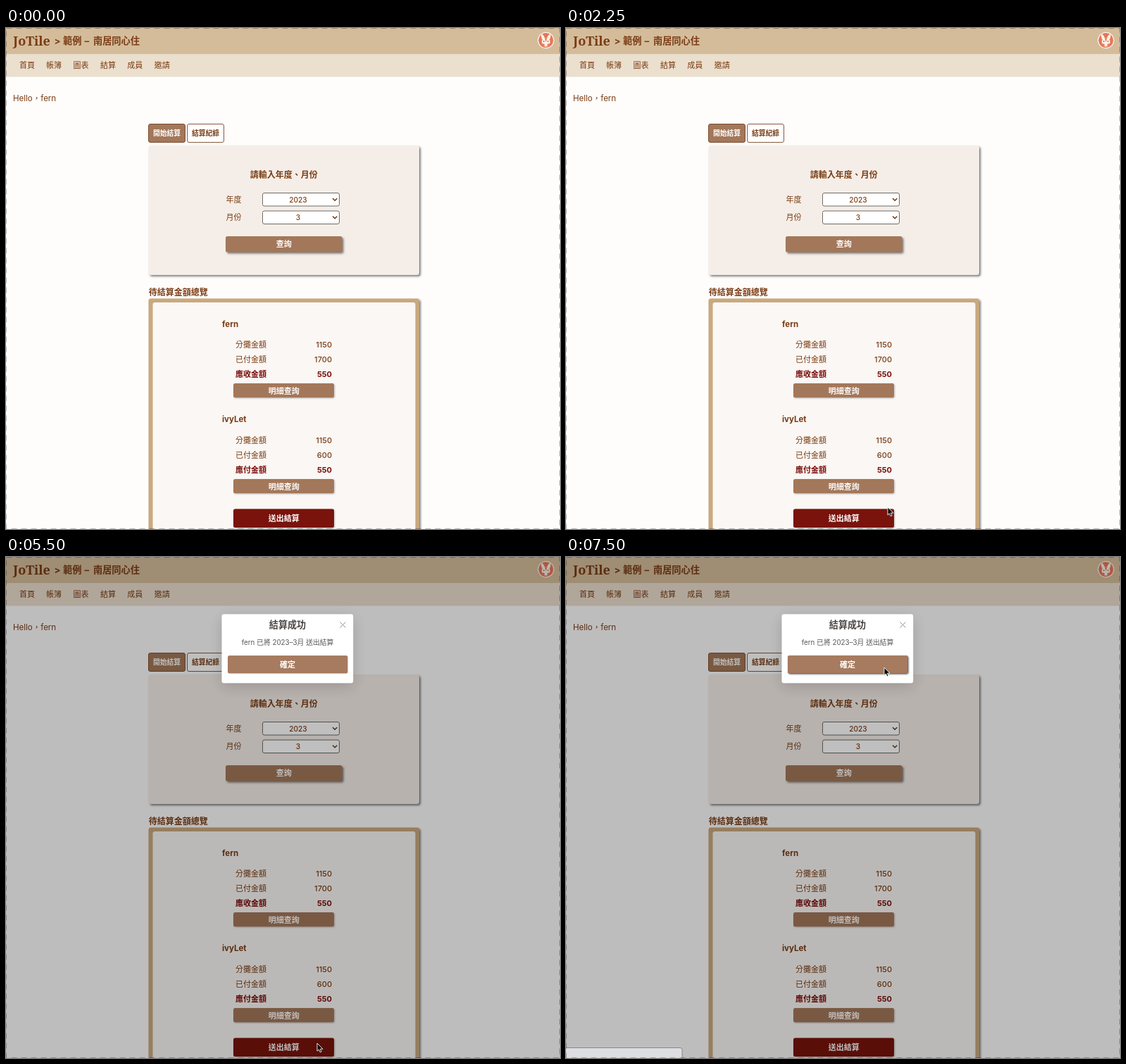
Animation, 787 px wide and 712 px high, one loop 8 s. Source, as an HTML page:

```html
<!DOCTYPE html>
<html lang="zh-Hant">
<head>
<meta charset="utf-8">
<title>結算</title>
<style>
  html, body { margin: 0; width: 100%; height: 100%; overflow: hidden; background: #fefdfc; }
  svg { display: block; width: 787px; height: 712px; }
  text {
    font: 500 11px Inter, "Noto Sans CJK TC", "Noto Sans CJK JP", "Noto Sans CJK", sans-serif;
    fill: #7a3c14;
    white-space: pre;
  }
  .b { font-weight: 700; }
  .mid { text-anchor: middle; }
  .end { text-anchor: end; }
  .s { font-size: 9.8px; }
  .l { font-size: 12px; }
  .crumb { font-size: 13.2px; font-weight: 700; }
  .logo { font: 700 18px "Noto Serif", serif; }
  .hello { font-size: 11.5px; font-weight: 400; }
  .light { fill: #fff; font-weight: 700; }
  .due { fill: #7b0f0b; font-weight: 700; }
  .btn { fill: #a3775a; }
  .send { fill: #79130b; }
  .soft { filter: drop-shadow(1px 1px 1px rgba(0, 0, 0, .25)); }
  .deep { filter: drop-shadow(2px 2px 1.5px rgba(0, 0, 0, .5)); }
  .field { fill: #fff; stroke: #6d6a68; }
  .line { fill: none; stroke: #6b3413; stroke-width: 1.5; stroke-linecap: round; stroke-linejoin: round; }
  .edge { fill: none; stroke: #000; stroke-opacity: .26; stroke-dasharray: 8 6; }

  .modal, .hover, .status, .cursor { animation: 8s step-end infinite; }
  .modal { animation-name: modal; }
  .hover { animation-name: hover; }
  .status { animation-name: status; }
  .cursor { animation-name: move; }
  .box { fill: #fff; filter: drop-shadow(0 5px 10px rgba(0, 0, 0, .16)); }

  @keyframes modal  { 0% { opacity: 0; } 62.5%, 100% { opacity: 1; } }
  @keyframes hover  { 0% { opacity: 0; } 84.375%, 100% { opacity: 1; } }
  @keyframes status { 0% { opacity: 0; } 93.75%, 100% { opacity: 1; } }
  @keyframes move {
    0%      { opacity: 0; transform: translate(745px, 278px); }
    15.625% { opacity: 1; transform: translate(745px, 278px); }
    18.75%  { opacity: 1; transform: translate(592px, 553px); }
    21.875% { opacity: 1; transform: translate(527px, 601px); }
    25%     { opacity: 1; transform: translate(482px, 658px); }
    28.125% { opacity: 1; transform: translate(457px, 681px); }
    31.25%  { opacity: 1; transform: translate(442px, 690px); }
    34.375% { opacity: 1; transform: translate(441px, 691px); }
    68.75%  { opacity: 1; transform: translate(442px, 691px); }
    71.875% { opacity: 1; transform: translate(453px, 688px); }
    75%     { opacity: 1; transform: translate(535px, 419px); }
    78.125% { opacity: 1; transform: translate(484px, 236px); }
    81.25%  { opacity: 1; transform: translate(454px, 168px); }
    84.375%, 100% { opacity: 1; transform: translate(452px, 157px); }
  }
</style>
</head>
<body>
<svg viewBox="0 0 787 712">
  <rect width="787" height="712" fill="#fefdfc"/>

  <!-- header -->
  <rect width="787" height="37" fill="#d4bc9b"/>
  <rect y="37" width="787" height="32.5" fill="#ebdfce"/>
  <text class="logo" x="10" y="24.5">JoTile</text>
  <text class="crumb" x="68.5" y="22.8">&gt;</text>
  <text class="crumb" x="81" y="22.8">範例</text>
  <text class="crumb" x="111.5" y="22.8">–</text>
  <text class="crumb" x="124" y="22.8">南居同心住</text>
  <g transform="translate(767 17.5)">
    <circle r="11.7" fill="#fbf3ea"/>
    <circle r="10.5" fill="#e5775a"/>
    <path d="M-5-1Q-8-6-6-9Q-3-8-1.5-3H1.5Q3-8 6-9Q8-6 5-1Q7 2 5 5Q3 9 0 9Q-3 9-5 5Q-7 2-5-1Z" fill="#fdf0e4"/>
    <path d="M-1.5-3H1.5L0 3ZM-5 5Q-2 4-1.5 8Q-4 8-5 5ZM5 5Q2 4 1.5 8Q4 8 5 5Z" fill="#e5775a"/>
    <circle cx="-3" cy="1.5" r=".8" fill="#6b3413"/>
    <circle cx="3" cy="1.5" r=".8" fill="#6b3413"/>
  </g>
  <text x="19" y="57.2">首頁</text>
  <text x="57" y="57.2">帳簿</text>
  <text x="95.5" y="57.2">圖表</text>
  <text x="134" y="57.2">結算</text>
  <text x="172.3" y="57.2">成員</text>
  <text x="210.7" y="57.2">邀請</text>
  <text class="hello" x="10" y="104">Hello，fern</text>

  <!-- tabs -->
  <rect class="btn" x="202.5" y="136.5" width="52" height="26" rx="2.5" stroke="#7f4e30"/>
  <text class="s light mid" x="228.5" y="152.8">開始結算</text>
  <rect x="257.5" y="136.5" width="52" height="26" rx="2.5" fill="#fff" stroke="#8a5a3c"/>
  <text class="s b mid" x="283.5" y="152.8">結算紀錄</text>

  <!-- query card -->
  <rect class="deep" x="202.5" y="167" width="384.5" height="184" rx="3.5" fill="#f5eee8"/>
  <text class="l b mid" x="394.7" y="213.2">請輸入年度、月份</text>
  <text x="312.5" y="247.7">年度</text>
  <text x="312.5" y="273.2">月份</text>
  <rect class="field" x="364.5" y="234.5" width="109" height="18.5" rx="2.5"/>
  <rect class="field" x="364.5" y="260" width="109" height="18.5" rx="2.5"/>
  <text class="mid" style="font-size:10.2px" x="415" y="247.5">2023</text>
  <text class="mid" style="font-size:10.2px" x="415" y="273">3</text>
  <path class="line" d="M464.5 242.5l2.7 2.7 2.7-2.7M464.5 268l2.7 2.7 2.7-2.7"/>
  <rect class="btn deep" x="312" y="296" width="165.5" height="22.5" rx="2.5"/>
  <text class="light mid" x="394.7" y="311.3">查詢</text>

  <!-- totals card -->
  <text class="l b" x="202.7" y="380">待結算金額總覽</text>
  <rect class="deep" x="202.5" y="384.5" width="384.5" height="350" rx="3" fill="#c9a97e"/>
  <rect x="208.5" y="390" width="373" height="340" rx="3" fill="#faf7f4"/>

  <text class="b" style="font-size:11.5px" x="307" y="424.5">fern</text>
  <text x="326" y="454">分攤金額</text><text class="end" x="463" y="454">1150</text>
  <text x="326" y="475">已付金額</text><text class="end" x="463" y="475">1700</text>
  <text class="due" x="326" y="495.7">應收金額</text><text class="due end" x="463" y="495.7">550</text>
  <rect class="btn soft" x="323" y="505" width="143" height="20.3" rx="2.5"/>
  <text class="light mid" x="394.7" y="519.6">明細查詢</text>

  <text class="b" style="font-size:11.5px" x="307" y="559.8">ivyLet</text>
  <text x="326" y="590">分攤金額</text><text class="end" x="463" y="590">1150</text>
  <text x="326" y="611">已付金額</text><text class="end" x="463" y="611">600</text>
  <text class="due" x="326" y="631.7">應付金額</text><text class="due end" x="463" y="631.7">550</text>
  <rect class="btn soft" x="323" y="641" width="143" height="20.3" rx="2.5"/>
  <text class="light mid" x="394.7" y="655.5">明細查詢</text>

  <rect class="send soft" x="323" y="683.5" width="143" height="26.5" rx="2.5"/>
  <text class="light mid" x="394.7" y="701.3">送出結算</text>

  <!-- dialog -->
  <g class="modal">
    <rect width="787" height="712" fill="#000" opacity=".25"/>
    <rect class="box" x="306.5" y="81.3" width="186.7" height="98" rx="3"/>
    <text class="b mid" style="font-size:13.1px;fill:#4b4745" x="400" y="101.3">結算成功</text>
    <path d="M474.5 92.5l8 8m0-8l-8 8" fill="none" stroke="#8f9195"/>
    <text class="mid" style="font-size:9.8px;font-weight:400;fill:#57585b" x="400" y="125.2">fern 已將 2023–3月 送出結算</text>
    <rect class="btn" x="315" y="140" width="170.5" height="25.5" rx="2.5" style="fill:#a67b5f"/>
    <rect class="hover" x="315" y="140" width="170.5" height="25.5" rx="2.5"
          style="fill:#a67b5f;filter:drop-shadow(1.5px 1.5px 1px rgba(0,0,0,.65))"/>
    <text class="light mid" x="400" y="157">確定</text>
  </g>

  <path class="status" d="M-1 697.5H162Q165 697.5 165 700.5V713H-1Z" fill="#dcdee2" stroke="#85868a"/>
  <rect class="edge" x=".5" y=".5" width="786" height="711"/>

  <path class="cursor" d="M0 0V11.2L2.5 8.9L4.2 12.8L6.1 12L4.4 8.2H8Z"
        fill="#000" stroke="#fff" stroke-width=".9" stroke-linejoin="round"/>
</svg>
</body>
</html>
```
